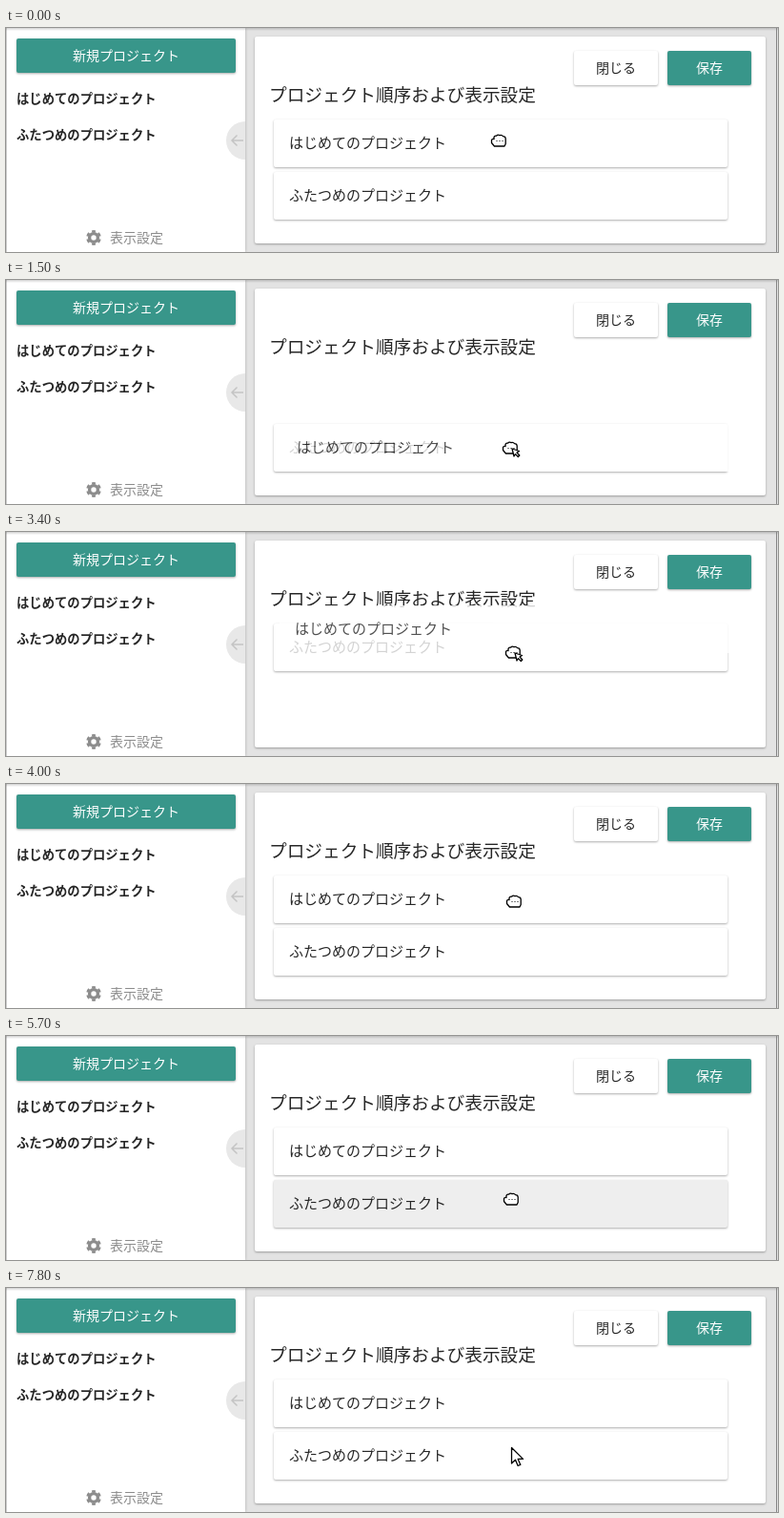
An HTML page for the animation above (7900 ms loop, 810 by 235 pixels).

```html
<!DOCTYPE html>
<html lang="ja">
<head>
<meta charset="utf-8">
<title>プロジェクト順序</title>
<style>
  html, body { margin: 0; width: 100%; height: 100%; overflow: hidden; }
  body { font-family: "Noto Sans CJK JP", "Noto Sans CJK", "Noto Sans", sans-serif; color: #262626; }
  #stage { position: relative; width: 810px; height: 235px; overflow: hidden; background: #e3e3e3; }
  #stage div, #stage svg { position: absolute; box-sizing: border-box; white-space: nowrap; }
  .side { left: 0; top: 0; width: 251px; height: 235px; background: #fff; border-left: 1px solid #ccc;
    box-shadow: 0 0 3px rgba(0,0,0,.25); }
  .top { left: 0; top: 0; width: 810px; height: 3px; background: linear-gradient(rgba(0,0,0,.17), transparent); }
  .edge { left: 808px; top: 0; width: 1px; height: 235px; background: #858585; }
  .btn, .card, .item { background: #fff; border-radius: 2px;
    box-shadow: 0 1px 3px rgba(0,0,0,.14), 0 1px 2px rgba(0,0,0,.2); }
  .btn { height: 36px; line-height: 35px; font-size: 14px; text-align: center; }
  .teal { background: #38968a; color: #fff; }
  .link { left: 11px; height: 20px; line-height: 19px; font-size: 13.33px; font-weight: 700; }
  .card { left: 261px; top: 9px; width: 536px; height: 217px; }
  .title { left: 276px; top: 55px; height: 30px; line-height: 28px; font-size: 18.67px; }
  .row { left: 281px; width: 476px; height: 50px; padding-left: 16px; line-height: 48px; font-size: 15px;
    background: #fff; }
  .setup { left: 109px; top: 210px; height: 20px; line-height: 18px; font-size: 14px; color: #8c8c8c; }
  #cursor { left: 0; top: 0; overflow: visible; }
  #cursor path { fill: #fff; stroke: #000; stroke-width: 1.3; stroke-linejoin: round; }
  #cursor .dots { fill: none; stroke-width: 1; stroke-dasharray: 1 2; }
</style>
</head>
<body>
<div id="stage">
  <div class="side"></div>
  <svg width="251" height="235" style="left:0;top:0">
    <circle cx="251" cy="118" r="20" fill="#e8e8e8"/>
    <path d="M249 118H237M242.5 112.5L237 118L242.5 123.5" fill="none" stroke="#c4c4c4" stroke-width="1.5"/>
    <g transform="translate(92 220)" fill="none" stroke="#8c8c8c">
      <circle r="4.4" stroke-width="3.4"/>
      <circle r="6.7" stroke-width="2.4" pathLength="60" stroke-dasharray="5.4 4.6" stroke-dashoffset="-2.3"/>
    </g>
  </svg>
  <div class="btn teal" style="left:11px;top:11px;width:230px">新規プロジェクト</div>
  <div class="link" style="top:64px">はじめてのプロジェクト</div>
  <div class="link" style="top:102px">ふたつめのプロジェクト</div>
  <div class="setup">表示設定</div>
  <div class="card"></div>
  <div class="btn" style="left:596px;top:24px;width:88px">閉じる</div>
  <div class="btn teal" style="left:694px;top:24px;width:88px">保存</div>
  <div class="title">プロジェクト順序および表示設定</div>
  <div class="row item" id="first">はじめてのプロジェクト</div>
  <div class="row item" id="second">ふたつめのプロジェクト</div>
  <div class="row" id="ghost">はじめてのプロジェクト</div>
  <div class="top"></div>
  <div class="edge"></div>
  <svg id="cursor" width="1" height="1">
    <g id="hand">
      <path d="M-4.6 6L-7.5 2.5V-.5Q-7 -2 -5 -1.5V-3.5Q-4.5 -5.3 -2.5 -4.8Q-1 -6.5 1 -5.4Q3 -6.3 4.6 -4.4Q7 -4.4 7.2 -2V3.5L6 6Z"/>
      <path class="dots" d="M-2.5 .5H5"/>
      <path id="badge" d="M2 1L9.5 3.5L7 5L9.8 8L8.3 9.5L5.5 6.6L4 9Z"/>
    </g>
    <path id="arrow" transform="translate(530.5 167)" d="M0 .5V17L4 13.3L6.6 19.5L9.3 18.4L6.7 12.4H12Z"/>
  </svg>
</div>
<script>
  const LOOP = 7900, STEP = 100, TOP = 96, BOTTOM = 151;
  const el = id => document.getElementById(id);
  const first = el('first'), second = el('second'), ghost = el('ghost');
  const hand = el('hand'), badge = el('badge'), arrow = el('arrow');

  // Where the hand rests, and the strokes it makes from there
  const home = { x: 517, y: 118 };
  const strokes = [
    { from: 900, to: 1800, x: 530, y: 199 },
    { from: 2700, to: 2800, x: 533, y: 177 },
    { from: 2800, to: 3400, x: 532, y: 126 },
    { from: 3500, to: 3700, x: 533, y: 123 },
    { from: 4300, to: 4700, x: 530, y: 171 }
  ];
  // Corner of the dragged copy relative to the hand; slip is its lag at the start
  const drags = [
    { from: 1000, to: 2000, dx: -240, dy: -25, slip: 0 },
    { from: 2800, to: 4000, dx: -245, dy: -49, slip: 9 }
  ];

  const within = (t, a, b) => t >= a && t < b;
  const progress = (t, a, b) => Math.min(1, Math.max(0, (t - a) / (b - a)));
  const easeOut = (p, power) => 1 - (1 - p) ** power;
  const fade = (t, start) => easeOut(progress(t, start, start + 4 * STEP), 1.5);
  const show = (node, on) => { node.style.display = on ? '' : 'none'; };

  // Sideways motion settles sooner than vertical motion
  function handAt(t) {
    let { x, y } = home;
    for (const s of strokes) {
      const p = progress(t, s.from, s.to);
      x += (s.x - x) * easeOut(p, 2);
      y += (s.y - y) * easeOut(p, 1.15);
    }
    return { x: Math.round(x), y: Math.round(y) };
  }

  function draw(t) {
    const { x, y } = handAt(t);
    const drag = drags.find(d => within(t, d.from, d.to));
    const swapped = within(t, 1600, 3600);
    const pointer = t >= LOOP - STEP;

    first.style.top = (swapped ? BOTTOM : TOP) + 'px';
    second.style.top = (swapped ? TOP : BOTTOM) + 'px';
    show(first, !drag);
    show(ghost, drag);
    if (drag) {
      const age = t - drag.from;
      const slip = drag.slip * (1 - progress(age, 0, 600));
      ghost.style.left = Math.round(x + drag.dx + slip) + 'px';
      ghost.style.top = Math.round(y + drag.dy + slip / 2) + 'px';
      ghost.style.opacity = Math.min(.8, .12 + age / 330);
    }

    const grey = 255 - 17 * (fade(t, 5300) - fade(t, 6400));
    second.style.background = `rgb(${grey},${grey},${grey})`;

    hand.setAttribute('transform', `translate(${x} ${y})`);
    show(hand, !pointer);
    show(arrow, pointer);
    show(badge, drag);
  }

  const start = performance.now();
  function tick() {
    const t = (performance.now() - start) % LOOP;
    draw(Math.floor(t / STEP) * STEP);
    requestAnimationFrame(tick);
  }
  tick();
</script>
</body>
</html>
```
